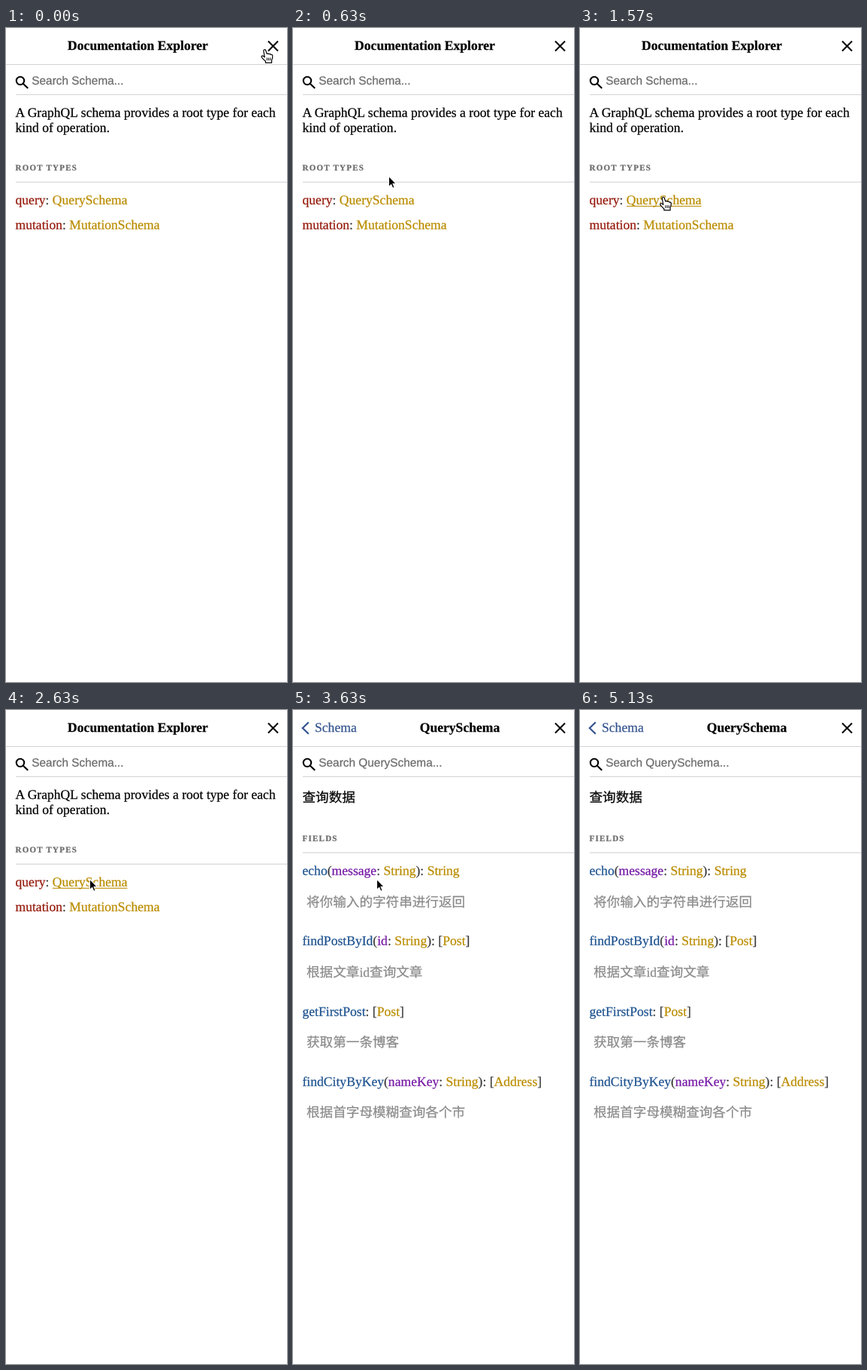
Write an HTML page that moves like this. It is 374x868 px and loops after 5160 ms.

```html
<!DOCTYPE html>
<html lang="en">
<head>
<meta charset="utf-8">
<style>
  html, body { margin: 0; width: 100%; height: 100%; overflow: hidden; background: #fff; }
  svg { display: block; }
  text {
    font: 17.6px "Liberation Serif", "Noto Sans CJK SC", "Noto Sans CJK", serif;
    color: #000; white-space: pre; text-rendering: geometricPrecision;
  }
  text, tspan { fill: currentColor; stroke: currentColor; stroke-width: .25px; }
  .title { font-weight: bold; text-anchor: middle; }
  .search { font: 15.4px "Liberation Sans", sans-serif; color: #6c6c6c; }
  .section { font-size: 11px; font-weight: bold; letter-spacing: 1.25px; color: #6c6c6c; }
  .back { color: #34548f; }
  .code { color: #3a3a3a; }
  .key { color: #951a0c; }
  .type { color: #ba8c00; }
  .field { color: #1d528f; }
  .arg { color: #7519a5; }
  .note { color: #8a8a8a; }
  .line { stroke: #d3d3d6; }
  .icon { fill: none; stroke: #000; stroke-width: 2.1; }
</style>
</head>
<body>
<svg width="374" height="868" viewBox="0 0 374 868">
  <path class="line" d="M0 48.5H374M13 88.5H374"/>
  <path class="icon" d="M349 17.5L362 30.5M362 17.5L349 30.5"/>
  <path class="icon" d="M22.9 73.9L29.2 80"/>
  <circle class="icon" cx="19" cy="70" r="5.2"/>

  <g id="root">
    <text class="title" x="175.5" y="29">Documentation Explorer</text>
    <text class="search" x="34.3" y="75">Search Schema...</text>
    <text x="12.5" y="118">A GraphQL schema provides a root type for each</text>
    <text x="12.5" y="138">kind of operation.</text>
    <text class="section" x="12.5" y="189">ROOT TYPES</text>
    <path class="line" d="M13 204.5H374"/>
    <text class="code" x="12.5" y="234"><tspan class="key">query</tspan>: <tspan class="type">QuerySchema</tspan></text>
    <path id="underline" stroke="#ba8c00" d="M62 236.5H161.5"/>
    <text class="code" x="12.5" y="267"><tspan class="key">mutation</tspan>: <tspan class="type">MutationSchema</tspan></text>
  </g>

  <g id="query">
    <path d="M20.8 16.2L12.8 24L20.8 31.8" fill="none" stroke="#34548f" stroke-width="2.2"/>
    <text class="back" x="29" y="29">Schema</text>
    <text class="title" x="222" y="29">QuerySchema</text>
    <text class="search" x="34.3" y="75">Search QuerySchema...</text>
    <text x="12.5" y="122">查询数据</text>
    <text class="section" x="12.5" y="174">FIELDS</text>
    <path class="line" d="M13 189.5H374"/>
  </g>

  <g id="cursor">
    <path id="arrow" fill="#000" stroke="#fff" stroke-width="1.1"
      d="M0 0V14.2L3.2 11.2L5.3 16L7.7 15L5.6 10.3H10Z"/>
    <g id="hand" stroke="#000" stroke-width="1.2" stroke-linejoin="round">
      <path fill="#fff" d="M-2.2 1.6C-2.4-.2 0-.6 .7 1L2.3 5.6C3 4.9 4.6 4.9 5 6C5.8 5.4 7.2 5.6 7.5 6.8
        C8.6 6.3 9.8 7 9.8 8.3C10 11 9.4 12.4 8.6 14V17.4H.4V15.4C-1.6 14-3 12-4.7 10.2C-5.6 8.6-3.6 7.6-2.2 8.8L-.7 10Z"/>
      <path stroke-width="1" d="M2.4 10.8V14.4M4.6 10.8V14.4M6.8 10.8V14.4"/>
    </g>
  </g>
</svg>
<script>
const LOOP = 5160, CLICK = 2630, OPEN = 2670;
const $ = id => document.getElementById(id);
const show = (id, on) => $(id).style.display = on ? '' : 'none';

// Field markup: f = field, a = argument, t = type
const kinds = { f: 'field', a: 'arg', t: 'type' };
const fields = [
  ['f{echo}(a{message}: t{String}): t{String}', '将你输入的字符串进行返回'],
  ['f{findPostById}(a{id}: t{String}): [t{Post}]', '根据文章id查询文章'],
  ['f{getFirstPost}: [t{Post}]', '获取第一条博客'],
  ['f{findCityByKey}(a{nameKey}: t{String}): [t{Address}]', '根据首字母模糊查询各个市']
];
$('query').insertAdjacentHTML('beforeend', fields.map(([code, note], i) => {
  const y = 219 + i * 93.33;
  const spans = code.replace(/([fat])\{(\w+)\}/g, (_, k, word) => `<tspan class="${kinds[k]}">${word}</tspan>`);
  return `<text class="code" x="12.5" y="${y}">${spans}</text><text class="note" x="18" y="${y + 41.5}">${note}</text>`;
}).join(''));

// Pointer stops: time, x, y
const path = [
  [30, 345, 28.7], [200, 312, 52], [400, 228, 118], [550, 162, 169], [630, 127.5, 196.5],
  [760, 121, 212], [1070, 129, 225], [1200, 111.5, 224.5]
];

function pointerAt(t) {
  const next = path.findIndex(p => p[0] > t);
  if (next < 1) return (next ? path[path.length - 1] : path[0]).slice(1);
  const a = path[next - 1], b = path[next], k = (t - a[0]) / (b[0] - a[0]);
  return [a[1] + (b[1] - a[1]) * k, a[2] + (b[2] - a[2]) * k];
}

function draw(now) {
  const t = now % LOOP, [x, y] = pointerAt(t);
  const onClose = x > 342 && y < 38;
  const onLink = x > 62 && x < 162 && y > 218 && y < 239;
  const isHand = t < CLICK && (onClose || onLink);
  show('root', t < OPEN);
  show('query', t >= OPEN);
  show('underline', onLink);
  show('hand', isHand);
  show('arrow', !isHand);
  $('cursor').setAttribute('transform', `translate(${x} ${y})`);
  $('cursor').setAttribute('opacity', Math.max(0, Math.min(1, (5130 - t) / 260)));
  requestAnimationFrame(draw);
}
requestAnimationFrame(draw);
</script>
</body>
</html>
```
